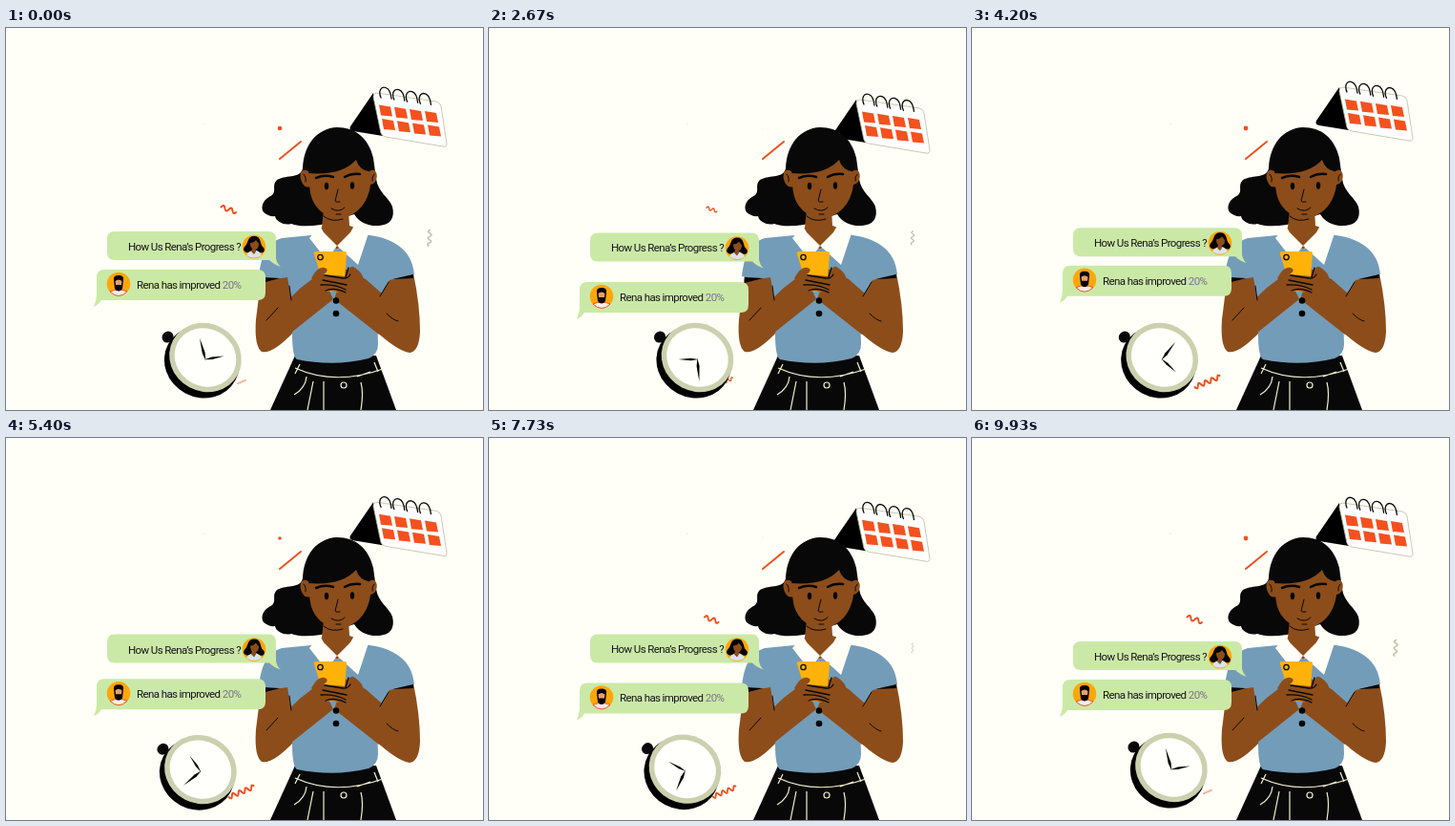
An HTML page that plays this animation: 500x400 px, repeating every 9990 ms.

```html
<!DOCTYPE html>
<html lang="en">
<head>
<meta charset="utf-8">
<title>Progress chat</title>
<style>
html, body { margin: 0; width: 100%; height: 100%; overflow: hidden; background: #fffff8; }
svg { display: block; width: 500px; height: 400px; }
text { font: 11.5px Roboto, "Liberation Sans", sans-serif; letter-spacing: -.6px; fill: #15131c; }
.line { fill: none; stroke: #080808; stroke-linecap: round; stroke-linejoin: round; }
.seam { fill: none; stroke: #f3f3cf; stroke-width: 1.2; }
.skin { fill: #8c4d1a; }
.shirt { fill: #739cb9; }
.bubble { fill: #cbe9a6; }
.red { fill: none; stroke: #f0501e; stroke-width: 2; stroke-linecap: round; }
</style>
</head>
<body>
<svg viewBox="0 0 500 400">
  <circle cx="208" cy="100" r=".6" fill="#ccc"/>
  <circle id="dot" r="2.4" fill="#f0501e"/>
  <path class="red" d="M287 137L309 119"/>
  <path id="leftWave" class="red"/>
  <path id="rightWave" class="red" style="stroke:#bfc2a5;stroke-width:1.5"/>
  <path id="clockWave" class="red"/>

  <g id="calendar">
    <path d="M385 68L361 103Q359 107 364 108L395 113Z"/>
    <path d="M389 68L451 77Q455 78 456 82L462 121Q462 125 458 124L398 114Q394 113 393 110L385 72Q385 68 389 68Z" fill="#fff" stroke="#b9bd98" stroke-width=".8"/>
    <g id="days" fill="#f4511e"/>
    <g id="rings" class="line" stroke-width="1.3"/>
  </g>

  <g id="woman">
    <path d="M311 147C308 158 296 153 284 159C278 165 284 170 279 175C270 179 266 187 270 193Q276 198 282 197C283 203 292 207 299 205Q310 209 330 206L365 195Q373 208 391 207C403 206 408 199 405 187C402 178 390 172 388 158L385 136C380 115 366 104 347 104C326 105 312 122 311 147Z" fill="#080808"/>
    <path class="skin" d="M333 190L331 209L324 215L347 232L371 211L360 207L359 190Z"/>
    <path class="skin" d="M317 150C309 145 306 155 311 163Q314 168 319 166ZM381 150C388 145 391 155 387 161Q384 165 380 164Z"/>
    <path class="skin" d="M316 152L319 172C322 190 338 200 349 199C368 198 380 182 382 164L383 151Q370 149 367 138Q352 155 316 152Z"/>
    <path class="line" stroke-width="1" d="M312 153Q315 156 314 161M386 153Q383 156 384 160M348 169L345 181Q346 183 350 182M341 189Q349 194 355 188M346 195H351M333 197Q341 204 353 200"/>
    <path class="line" stroke-width="2.5" d="M325 157Q334 153 343 156M355 156Q362 152 371 153"/>
    <g id="openEyes"><ellipse cx="336" cy="165.500" rx="2.200" ry="3.700"/><ellipse cx="363" cy="165" rx="2.200" ry="3.700"/></g>
    <path id="closedEyes" class="line" stroke-width="1" d="M330 166Q335 169 341 167M357 167Q363 169 368 165"/>

    <path d="M303 343L277 400H409L388 343Z" fill="#080808"/>
    <path class="seam" d="M303 356Q345 375 395 357M308 352L303 362M322 370L316 400M333 370V400M368 365L382 360M372 371Q375 382 372 400M386 350L390 360M315 365Q314 377 302 384"/>
    <circle class="seam" cx="354" cy="374" r="3"/>

    <path class="skin" d="M268 258L262 305Q260 333 268 339Q279 342 302 318L310 250ZM394 255L427 257Q434 290 434 318Q433 339 423 340Q410 338 386 316Z"/>
    <path class="shirt" d="M320 217L289 220C270 226 267 245 265 260Q281 264 295 261L299 285L300 320Q300 344 305 347Q344 355 380 346Q390 342 390 331L389 300L392 280L402 264L428 258C426 233 407 219 374 216L347 232Z"/>
    <path class="skin" d="M299 319L343 284L330 256L309 272L288 292ZM391 321L344 284L355 252L377 263L402 285Z"/>
    <path d="M268 261L287 262L268 267ZM405 263L427 258V262Z"/>
    <path class="line" stroke-width="1" d="M285 293L273 306M399 299Q406 306 411 307M299 285L297 270M392 281L401 266"/>
    <path d="M329 207L318 220L336 243L347 228L333 214ZM365 207L380 215L369 248L347 228L361 214Z" fill="#fffff8"/>
    <path d="M325 234H355Q357 234 357 236L354 277L335 275L323 237Q322 234 325 234Z" fill="#ffb20a"/>
    <circle class="line" cx="329.500" cy="240" r="2.700" stroke-width="1.300"/>
    <path class="skin" d="M320 262Q327 249 334 251Q340 253 333 258L355 260Q360 248 364 250Q378 258 374 271L361 282Q353 283 348 276L333 274Z"/>
    <path class="line" stroke-width="1.300" d="M334 259L353 262Q358 263 361 258M332 264L357 269M330 269Q345 268 356 274M335 275Q344 271 356 277M359 251L356 261"/>
    <circle cx="346" cy="285.500" r="3.300"/><circle cx="346" cy="299" r="3.300"/>
  </g>

  <g id="question">
    <path class="bubble" d="M114 213H275Q283 213 283 221V241Q284 247 288 250Q281 248 276 243H114Q106 243 106 235V221Q106 213 114 213Z"/>
    <text x="128" y="233">How Us Rena’s Progress ?</text>
    <circle cx="260" cy="229" r="12.300" fill="#ffa60a"/>
    <path d="M260 218C253 218 254 225 251 228C246 233 252 237 257 234H264C270 238 273 232 269 229C266 226 268 218 260 218Z"/>
    <path d="M252 238Q254 234 258 233H263Q267 235 268 238Q260 243 252 238Z" fill="#d9e4ed"/>
    <path class="skin" d="M256 225Q260 225 262 222L265 226Q265 232 260 232Q256 231 256 225ZM258 231H262V234L260 237L257 234Z"/>
  </g>

  <g id="answer">
    <path class="bubble" d="M103 253H264Q272 253 272 261V277Q272 285 264 285H100Q97 290 92 292Q95 285 95 279V261Q95 253 103 253Z"/>
    <text x="137" y="273">Rena has improved <tspan fill="#7a7090">20%</tspan></text>
    <circle cx="118" cy="268" r="12.300" fill="#ffa60a"/>
    <path d="M109 276Q118 272 127 276Q118 285 109 276Z" fill="#f6eee8" stroke="#e9552a"/>
    <path d="M113 264Q112 259 118 259Q124 259 123 264L122 273Q118 278 114 273Z"/>
    <path d="M114.500 265Q118 262 121.500 265L121 269H115Z" fill="#e3a06f"/>
  </g>

  <g id="clock">
    <path class="line" stroke-width="11" d="M169 324L170 323"/>
    <path class="line" stroke-width="6" d="M170 324L178 330"/>
    <g transform="rotate(28 209 345)">
      <ellipse cx="208" cy="351" rx="40" ry="37"/>
      <ellipse cx="209" cy="345" rx="38.500" ry="35.500" fill="#cbd0ae"/>
      <ellipse cx="209" cy="345" rx="33" ry="30" fill="#fffffb"/>
    </g>
    <g id="hands">
      <path d="M209 348L207.500 340L209 324L210.500 340Z"/>
      <path d="M209 348L207.800 340L209 327L210.200 340Z" transform="rotate(95 209 347)"/>
    </g>
  </g>
</svg>
<script>
const LOOP = 9990;
const BEATS = [0, 1.3, 2.7, 4.4, 6.6, 8.8, LOOP / 1000];
const el = id => document.getElementById(id);
const place = (id, transform) => el(id).setAttribute("transform", transform);
const smooth = s => s * s * (3 - 2 * s);

// Ease from rest through one pose per beat and back to rest.
function drift(t, ...poses) {
  const values = [0, ...poses, 0];
  const i = BEATS.findIndex(beat => beat > t);
  const s = (t - BEATS[i - 1]) / (BEATS[i] - BEATS[i - 1]);
  return values[i - 1] + (values[i] - values[i - 1]) * smooth(s);
}

// Scale that swells around a peak time, limited to 0..1.
function pulse(t, mean, swing, peak, beats = 1) {
  const angle = 2 * Math.PI * beats * (t * 1000 / LOOP - peak / 10);
  return Math.min(1, Math.max(0, mean + swing * Math.cos(angle)));
}

// Wavy stroke centred on the origin.
function squiggle(id, dx, dy, cycles, size) {
  const length = Math.hypot(dx, dy);
  let d = "";
  for (let s = 0; s <= 1; s += 1 / 48) {
    const w = size * Math.sin(2 * Math.PI * cycles * s) / length;
    d += `${d ? "L" : "M"}${dx * (s - .5) - dy * w} ${dy * (s - .5) + dx * w}`;
  }
  el(id).setAttribute("d", d);
}
squiggle("leftWave", 16, 5, 2, -2.3);
squiggle("rightWave", -1, 17, 2.5, 1.8);
squiggle("clockWave", 27, -11, 4, 2.3);

for (let col = 0; col < 4; col++) {
  for (let row = 0; row < 2; row++)
    el("days").innerHTML += `<path transform="translate(${398 + 16 * col + 3 * row} ${86.5 + 2.2 * col + 14.5 * row})" d="M-7-6L5-4L7 6L-5 5Z"/>`;
  el("rings").innerHTML += `<path transform="translate(${col * 13.8} ${col * 2.1})" d="M393 73C390 66 393 61 398 62.500Q403 64 404 74"/>`;
}

function draw() {
  const ms = performance.now() % LOOP, t = ms / 1000;
  place("calendar", `translate(0 ${drift(t, 7, 7, -6.5, 7, 3.5)})`);
  place("question", `translate(0 ${drift(t, -4, 1.5, -4, -12, -3.5)})`);
  place("answer", `translate(0 ${drift(t, 11.5, 13, -5, 5, 2)})`);
  place("clock", `translate(${drift(t, 10, 9.5, -10.5, 2, -8.5)} ${drift(t, 0, 0, 0, 5, -1.5)})`);
  place("hands", `rotate(${1080 * smooth(ms / LOOP) - 15} 209 347)`);
  place("dot", `translate(287 105) scale(${pulse(t, .5, .6, 4.5, 2)})`);
  place("leftWave", `translate(233.5 190) scale(${pulse(t, .8, 1, 0)})`);
  place("rightWave", `translate(444 220) scale(${pulse(t, .7, 1, .4)})`);
  place("clockWave", `translate(247 370.5) scale(${pulse(t, .8, .5, 5.6)})`);
  const blink = t > 1.03 && t < 1.24;
  el("openEyes").style.display = blink ? "none" : "";
  el("closedEyes").style.display = blink ? "" : "none";
  requestAnimationFrame(draw);
}
draw();
</script>
</body>
</html>
```
